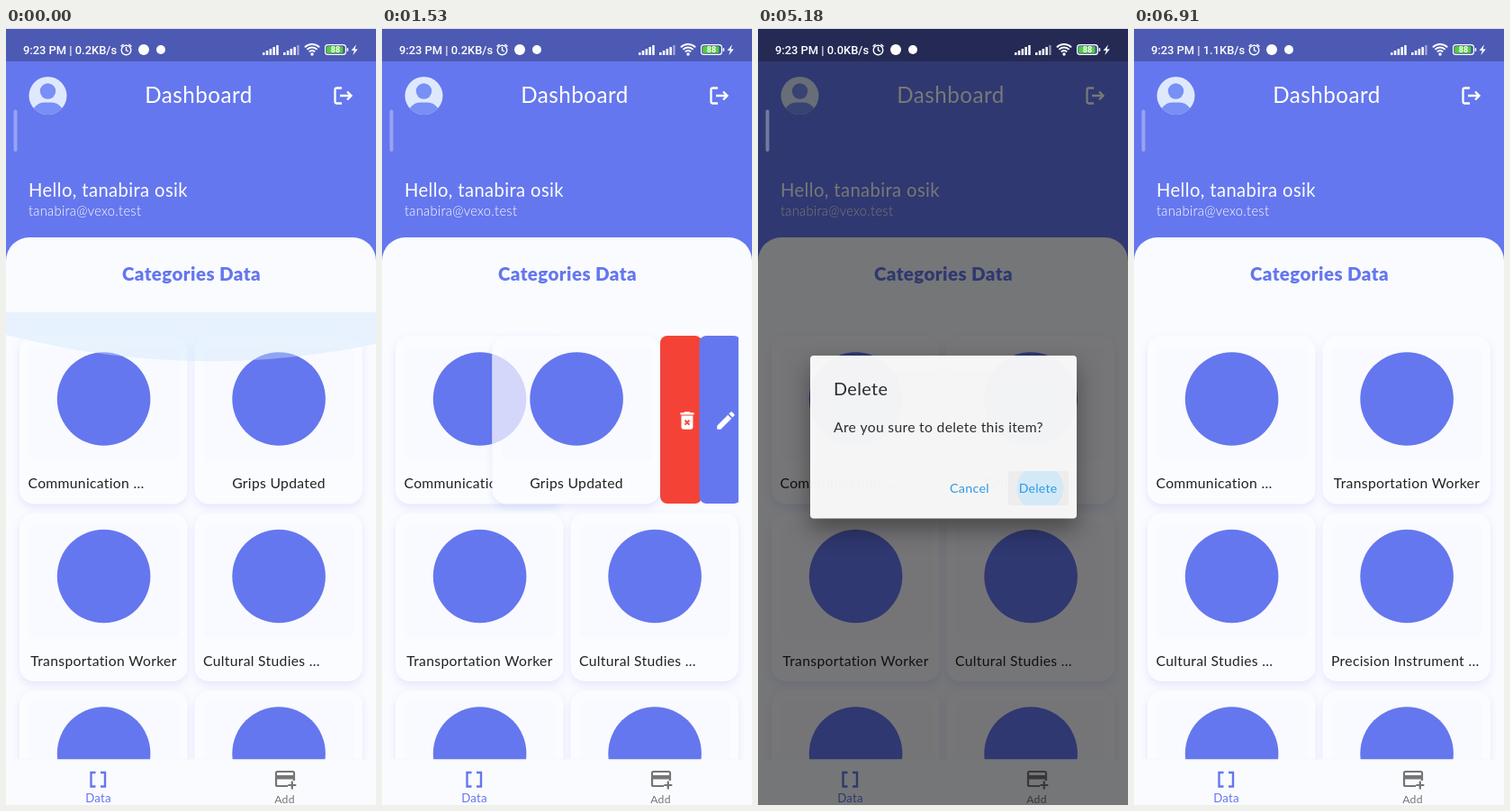
An HTML page with a canvas that plays this animation: 411 px wide and 861 px high, repeating every 9700 ms.

```html
<!DOCTYPE html>
<html lang="en">
<head>
<meta charset="utf-8">
<title>Dashboard</title>
<style>
  html, body { margin: 0; width: 100%; height: 100%; overflow: hidden; }
  canvas { display: block; }
</style>
</head>
<body>
<canvas id="stage" width="411" height="861"></canvas>
<script>
const ctx = document.getElementById('stage').getContext('2d');
const LOOP = 9700, BLUE = '#6577ee', PAPER = '#fafbff', INK = '#222';
const CARD = 186.5, ROW = 196.5, TOP = 341, LEFT = [15, 209.5];

const SLIDE = [[0, 0], [870, 18], [990, 37], [1140, 46], [1260, 54], [1410, 73],
  [1530, 87], [1650, 92], [1800, 93], [4020, 1], [4170, 0]];
const SPEED = [[0, '0.2'], [2070, '0.0'], [5720, '1.1']];
const RIPPLE = [[0, 0], [5050, 18], [5180, 26], [5310, 0]];
const at = (keys, t) => keys.filter(k => k[0] <= t).pop()[1];

const BEFORE = ['Communication …', 'Grips Updated', 'Transportation Worker', 'Cultural Studies …', '', ''];
const AFTER = ['Communication …', 'Transportation Worker', 'Cultural Studies …', 'Precision Instrument …', '', ''];

const BIN = new Path2D('M6 19a2 2 0 0 0 2 2h8a2 2 0 0 0 2-2V7H6zM19 4h-3.5l-1-1h-5l-1 1H5v2h14z');
const BIN_X = new Path2D('M9.7 11.7l4.6 4.6m0-4.6l-4.6 4.6');
const PENCIL = new Path2D('M3 17.25V21h3.75L17.81 9.94l-3.75-3.75zM20.71 7.04a1 1 0 0 0 0-1.41' +
  'l-2.34-2.34a1 1 0 0 0-1.41 0l-1.83 1.83 3.75 3.75z');
const EXIT = new Path2D('M373 66.5h-5.5q-2 0-2 2v13q0 2 2 2h5.5M371 75h12M379 70.5l4.5 4.5-4.5 4.5');
const BRACKETS = new Path2D('M99.5 825h-5v15.5h5M105 825h5v15.5h-5');
const ADD_CARD = new Path2D('M313 840h-11.5q-1.5 0-1.5-1.5v-13q0-1.5 1.5-1.5h17q1.5 0 1.5 1.5v8.5M317.8 834.5v9M313.3 839h9');
const BOLT = new Path2D('M389 18.5l-5.5 6.5h3.3l-1.5 5 5.5-6.5h-3.3z');
const CLOCK = new Path2D('M133.5 21v3.5l2.5 1.5M127.5 20.5l3-2.5M139.5 20.5l-3-2.5');

function box(x, y, w, h, r, color) {
  ctx.fillStyle = color;
  ctx.beginPath();
  ctx.roundRect(x, y, w, h, r);
  ctx.fill();
}

function disc(x, y, r, color) {
  ctx.fillStyle = color;
  ctx.beginPath();
  ctx.arc(x, y, r, 0, 7);
  ctx.fill();
}

function line(path, color, width) {
  ctx.strokeStyle = color;
  ctx.lineWidth = width;
  ctx.stroke(path);
}

function text(str, x, y, size, color, { weight = 400, align = 'left', family = 'Lato' } = {}) {
  ctx.font = `${weight} ${size}px ${family}, sans-serif`;
  ctx.letterSpacing = family === 'Lato' ? `${size * 0.02}px` : '0px';
  ctx.textAlign = align;
  ctx.fillStyle = color;
  ctx.fillText(str, x, y);
}

function shadow(color, blur, dy) {
  ctx.shadowColor = color;
  ctx.shadowBlur = blur;
  ctx.shadowOffsetY = dy;
}

function scoped(draw) {
  ctx.save();
  draw();
  ctx.restore();
}

function clipBox(x, y, w, h, r = 0) {
  ctx.beginPath();
  ctx.roundRect(x, y, w, h, r);
  ctx.clip();
}

function header() {
  box(0, 0, 411, 300, 0, BLUE);
  box(0, 0, 411, 37, 0, '#4d5ab4');
  scoped(() => {
    ctx.beginPath();
    ctx.arc(46.5, 75, 21, 0, 7);
    ctx.clip();
    box(25, 53, 43, 43, 0, '#dfe9fd');
    box(28, 82.5, 37, 30, 15, '#788ff5');
    disc(46.5, 70, 10, '#dfe9fd');
    disc(46.5, 70, 8.7, '#788ff5');
  });
  text('Dashboard', 214, 83, 24.2, '#fff', { align: 'center' });
  line(EXIT, '#fff', 2.3);
  text('Hello, tanabira osik', 25, 187, 20.2, '#fff');
  text('tanabira@vexo.test', 25, 208, 14.7, '#fff', { weight: 300 });
  box(0, 232, 411, 640, 26, PAPER);
  text('Categories Data', 206, 280, 20.5, BLUE, { weight: 900, align: 'center' });
}

function card(x, y, label, ghostX) {
  scoped(() => {
    shadow('rgba(101,119,238,.15)', 8, 4);
    box(x, y, CARD, CARD, 16, '#fbfcff');
  });
  box(x + 10, y + 12, 168, 127, 8, '#f9faff');
  // The neighbour's disc shows faintly through a card sliding over it.
  if (ghostX) scoped(() => {
    clipBox(x, y, CARD, CARD, 16);
    disc(ghostX, y + 70, 51.7, '#d4d6fa');
  });
  disc(x + 93.6, y + 70, 51.8, BLUE);
  if (label.endsWith('…')) text(label, x + 9.5, y + 169, 15.7, INK);
  else text(label, x + 93.5, y + 169, 15.7, INK, { align: 'center' });
}

function icon(x, y, draw) {
  scoped(() => {
    ctx.translate(x - 13, y - 13);
    ctx.scale(1.08, 1.08);
    ctx.fillStyle = '#fff';
    draw();
  });
}

function actions(offset) {
  const right = 396, redX = right - offset, blueX = right - offset / 2;
  scoped(() => {
    clipBox(LEFT[1], TOP, right - LEFT[1], CARD);
    box(redX, TOP, 46.5, 186, 8, '#f44336');
    icon(redX + 30, 435, () => {
      ctx.fill(BIN);
      line(BIN_X, '#f44336', 1.8);
    });
    box(blueX, TOP, 46.5, 186, 8, BLUE);
    icon(blueX + 29.5, 435, () => ctx.fill(PENCIL));
  });
}

function glow(t) {
  const fade = t < 150 ? 1 : Math.max(0, 0.7 - (t - 150) / 1000);
  if (!fade) return;
  const sideY = t < 150 ? 340 : 330, dipY = t < 150 ? 393 : 348;
  ctx.fillStyle = `rgba(205,229,253,${0.42 * fade})`;
  ctx.beginPath();
  ctx.moveTo(0, 315);
  ctx.lineTo(411, 315);
  ctx.lineTo(411, sideY + 10);
  ctx.quadraticCurveTo(206, dipY, 0, sideY);
  ctx.fill();
}

function grid(t) {
  const offset = at(SLIDE, t), labels = t < 5720 ? BEFORE : AFTER;
  scoped(() => {
    clipBox(0, 315, 411, 495.5);
    labels.forEach((label, i) => {
      if (i !== 1) card(LEFT[i % 2], TOP + ROW * (i >> 1), label);
    });
    if (offset) actions(offset);
    card(LEFT[1] - offset, TOP, labels[1], offset > 40 && LEFT[0] + 93.6);
    glow(t);
  });
}

function navigation() {
  box(0, 810.5, 411, 51, 0, PAPER);
  line(BRACKETS, BLUE, 2.4);
  text('Data', 102.5, 858, 13.2, BLUE, { align: 'center' });
  line(ADD_CARD, '#757575', 2.2);
  box(300, 828, 20, 4.5, 0, '#757575');
  text('Add', 309.5, 859, 12.2, '#757575', { align: 'center' });
}

function dialog(t) {
  if (t < 4020 || t >= 5310) return;
  const ripple = at(RIPPLE, t);
  box(0, 0, 411, 861, 0, 'rgba(0,0,0,.53)');
  scoped(() => {
    ctx.globalAlpha = t < 5180 ? 1 : 0.95;
    scoped(() => {
      shadow('rgba(0,0,0,.4)', 26, 12);
      box(58, 363, 296, 180.5, 4, '#fefefe');
    });
    if (ripple) scoped(() => {
      clipBox(278, 491, 67, 38, 3);
      box(278, 491, 67, 38, 0, '#eeeeef');
      disc(313.5, 510, ripple, '#d3e9f8');
    });
    text('Delete', 84, 407, 19.8, INK);
    text('Are you sure to delete this item?', 84, 448, 15.7, INK);
    text('Cancel', 235, 515, 14.3, '#2196e3', { align: 'center' });
    text('Delete', 311, 515, 14, '#2196e3', { align: 'center' });
  });
}

function signal(x, lit) {
  for (let i = 0; i < 5; i++) {
    const h = 3 + i * 2;
    box(x + i * 3.8, 30 - h, 2.5, h, 0.5, i < lit ? '#fff' : 'rgba(255,255,255,.45)');
  }
}

function statusBar(t) {
  text(`9:23 PM | ${at(SPEED, t)}KB/s`, 19, 28.5, 12.9, '#fff', { weight: 500, family: 'Roboto' });
  ctx.strokeStyle = '#fff';
  ctx.lineWidth = 1.4;
  ctx.beginPath();
  ctx.arc(133.5, 24.5, 5.3, 0, 7);
  ctx.stroke();
  line(CLOCK, '#fff', 1.4);
  disc(153, 24, 6, '#fff');
  disc(172, 24, 5, '#fff');
  signal(285, 5);
  signal(308, 4);
  ctx.lineWidth = 1.9;
  for (const r of [4.5, 8, 11.5]) {
    ctx.beginPath();
    ctx.arc(340, 29.5, r, Math.PI * 1.25, Math.PI * 1.75);
    ctx.stroke();
  }
  disc(340, 29, 1.7, '#fff');
  box(354, 18, 24, 12, 3.5, '#fff');
  box(355.2, 19.2, 21.6, 9.6, 2.5, '#4a57a6');
  box(356.2, 20.2, 18, 7.6, 1.5, '#50cf3c');
  box(378.6, 22, 1.6, 4, 0.8, '#fff');
  text('88', 366, 27.4, 9, '#fff', { weight: 700, align: 'center', family: 'Roboto' });
  ctx.fillStyle = '#fff';
  ctx.fill(BOLT);
  box(8.5, 90.5, 4, 46.5, 2, 'rgba(255,255,255,.33)');
  box(0, 0, 411, 1, 0, '#e9eaf2');
}

function frame() {
  const t = performance.now() % LOOP;
  header();
  grid(t);
  navigation();
  dialog(t);
  statusBar(t);
  requestAnimationFrame(frame);
}
frame();
</script>
</body>
</html>
```
